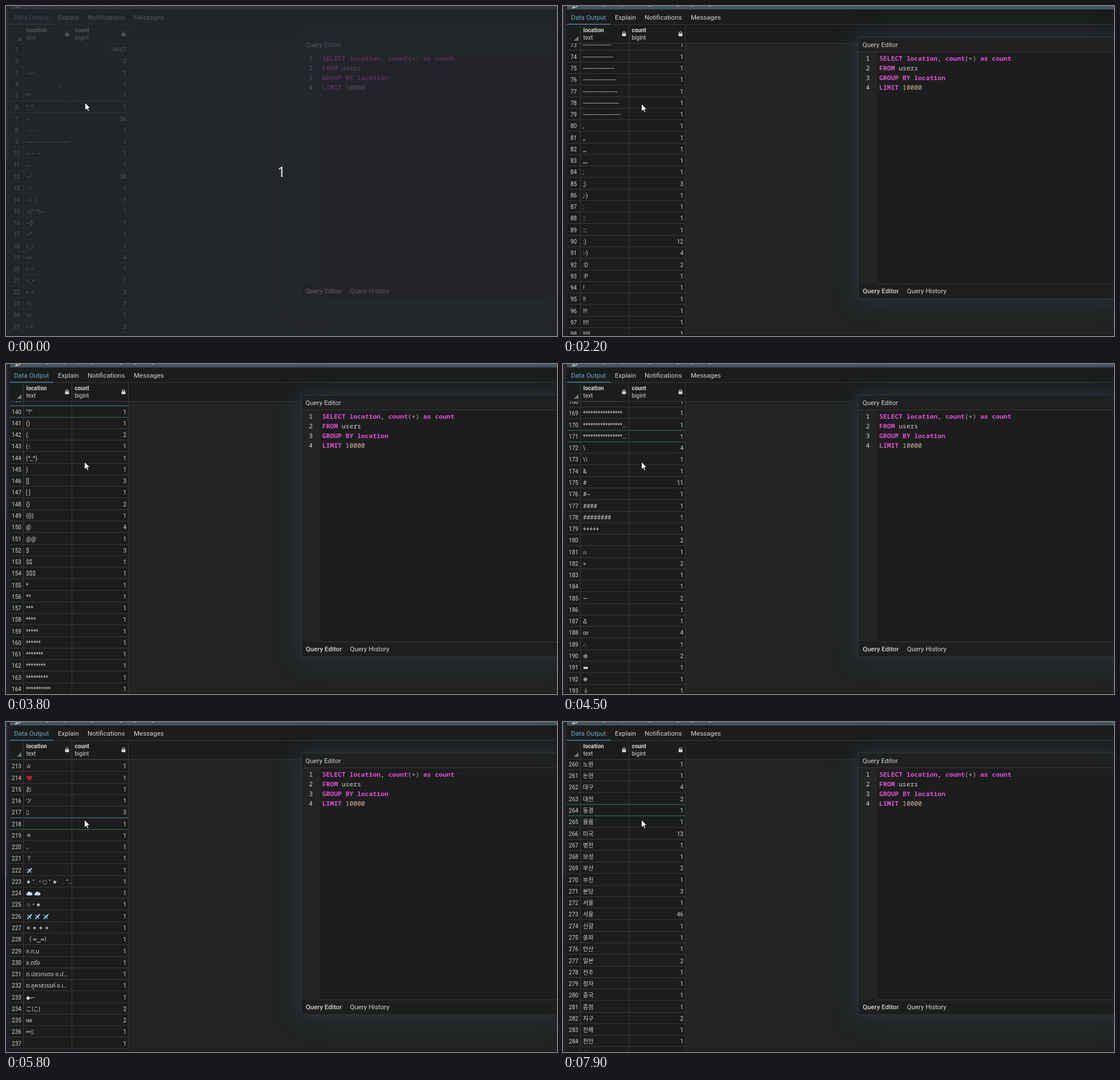
Animation, 966 px wide and 579 px high, one loop 8000 ms. Source, as an HTML page:

```html
<!DOCTYPE html>
<html lang="en">
<head>
<meta charset="utf-8">
<title>Query result</title>
<style>
html, body { margin: 0; width: 100%; height: 100%; overflow: hidden; background: #212423; }
#stage { position: relative; width: 966px; height: 579px; overflow: hidden; background: #212423;
  font: 11.5px Roboto, "Noto Sans", sans-serif; color: #d3d5d2; }
#stage div, #stage svg.abs { position: absolute; }
.t { line-height: 20px; white-space: pre; }
.h { font-size: 10px; }
b { font-weight: 700; }
#body { left: 7px; top: 66px; width: 208px; height: 511px; overflow: hidden; background: #1b1d1c; font-size: 10px; }
#rows { left: 0; top: -1px; width: 208px; }
.row { left: 0; width: 208px; height: 20px; line-height: 24px; border-bottom: 1px solid #36393e; white-space: pre; }
.row span { position: absolute; top: 0; }
.num { left: 0; width: 23px; text-align: center; }
.loc { left: 28px; width: 80px; height: 20px; overflow: hidden; text-spacing-trim: space-all;
  font-family: Roboto, "Noto Sans", "DejaVu Sans", "Noto Sans CJK KR", "Noto Sans CJK JP", "Noto Sans Thai", sans-serif; }
.cnt { right: 4px; }
.loc svg { width: 12px; height: 11px; vertical-align: -2px; }
#hover { left: 0; width: 208px; height: 19px; border: solid #3a6878; border-width: 1px 0; }
.v { width: 1px; background: #36393e; }
.hl { height: 1px; background: #36393e; }
#panel { left: 517px; top: 54px; width: 460px; height: 458px; background: #1c1e1d; border: 1px solid #343842;
  box-shadow: 0 2px 34px 4px #2c303b; }
.code { font: 11.35px/20px "Noto Sans Mono", "DejaVu Sans Mono", monospace; }
.code b { color: #e44fd6; }
.code i { color: #dcbb98; font-style: normal; }
.code u { color: #a9aca8; text-decoration: none; }
.code s { position: relative; top: 2px; text-decoration: none; }
#dim { left: 0; top: 0; width: 966px; height: 579px; background: rgba(36, 39, 46, .73); }
#one { left: 433px; top: 272px; width: 100px; text-align: center; color: #f1f1f1;
  font: 25px/36px "Noto Sans", "Open Sans", sans-serif; }
</style>
</head>
<body>
<div id="stage">
  <div style="left:0;top:0;width:7px;height:579px;background:#1e2129"></div>
  <div style="left:0;top:0;width:3px;height:272px;background:#2a2d36"></div>
  <div style="left:7px;top:0;width:959px;height:66px;background:#1b1d1d"></div>
  <div style="left:7px;top:0;width:959px;height:6px;background:#43555e;overflow:hidden">
    <div class="t" style="left:28px;top:-15px">opening query on postgres/postgres@PostgreSQL</div>
    <svg class="abs" style="left:7px;top:-6px" width="12" height="11"><path d="M2 10L5 7a4 4 0 1 1 3 1z" fill="none" stroke="#d3d5d2" stroke-width="1.3"/></svg>
  </div>
  <div class="hl" style="left:7px;top:32px;width:959px"></div>
  <div style="left:7px;top:31px;width:76px;height:2px;background:#3b7085"></div>
  <div class="t" style="left:14px;top:10px;color:#68abc6">Data Output</div>
  <div class="t" style="left:91px;top:10px">Explain</div>
  <div class="t" style="left:143px;top:10px">Notifications</div>
  <div class="t" style="left:224px;top:10px">Messages</div>

  <div class="hl" style="left:7px;top:65px;width:511px"></div>
  <svg class="abs" style="left:19px;top:53px" width="8" height="8"><path d="M8 0V8H0z" fill="#777a7b"/></svg>
  <div class="t h" style="left:35.5px;top:33px"><b>location</b></div>
  <div class="t h" style="left:35.5px;top:46px">text</div>
  <div class="t h" style="left:120.5px;top:33px"><b>count</b></div>
  <div class="t h" style="left:120.5px;top:46px">bigint</div>
  <svg class="abs" style="left:0;top:44px" width="215" height="11" fill="#cfd1ce" stroke="#cfd1ce">
    <g id="lock"><path d="M104 4.5h6v4h-6z" stroke-width="1"/><path d="M105 4.5V3a2 2 0 0 1 4 0V4.5" fill="none" stroke-width="1.2"/></g>
    <use href="#lock" x="99"/>
  </svg>

  <div id="body"><div id="rows"><div id="hover"></div></div></div>
  <div class="v" style="left:30px;top:34px;height:543px"></div>
  <div class="v" style="left:115px;top:34px;height:543px"></div>
  <div class="v" style="left:214px;top:34px;height:543px"></div>

  <div id="panel">
    <div style="left:0;top:0;width:460px;height:25px;background:#1f2121"></div>
    <div style="left:0;top:26px;width:33px;height:406px;background:#222524"></div>
    <div style="left:0;top:432px;width:460px;height:26px;background:#1d1f1f"></div>
    <div class="hl" style="left:0;top:25px;width:460px"></div>
    <div class="hl" style="left:33px;top:432px;width:427px"></div>
  </div>
  <div class="t" style="left:525px;top:58px">Query Editor</div>
  <div class="t" style="left:525.5px;top:490px;font-weight:500">Query Editor</div>
  <div class="t" style="left:603px;top:490px">Query History</div>
  <div id="sql"></div>
  <div style="left:0;top:577px;width:966px;height:2px;background:#1c181d"></div>

  <div id="dim"></div>
  <div id="one">1</div>
  <svg class="abs" id="mouse" width="14" height="20"><path d="M1.5 1.5V15L4.6 12.2 6.8 17 9 16 6.8 11.4H11z" fill="#fff" stroke="#111" stroke-width="1"/></svg>
</div>
<script>
const $ = id => document.getElementById(id);
const PITCH = 20.27, LOOP = 8000, TIP = 106;

// n lines of a growing run of one character
const fill = (ch, from, n) => Array.from({ length: n }, (_, i) => ch.repeat(from + i)).join("\n");

// one line per row: location, then ¦count where it is not 1
const data = String.raw`¦14667
ˋ¦2
ˋ~~
ˋ                      _
^^
^_^
~¦56
~~
~~~~~~~~~~~
~ ~ ~
~-
~/¦58
~/.
~/../
~(^.^)~
~$
~*
<_<
==¦4
= =
=_=
=.=¦3
=)¦7
><
>.<¦2
>_<¦6
>.>
>_>¦2
${fill(">", 2, 4)}
${fill("|", 1, 5)}
|_|
ˋシャンハイ
_¦5
___
______         ______
¯\_(ツ)_/¯¦23

-¦174
-<
-> ( | )
- -
- -
-_-¦2
-_-!!!
--¦11
--
-- -- --
---¦10
--->  .   <---
----¦3
---- - ---- ------ - -----…
---- *
-----¦2
------
-------¦3
-------->
--------->>>
${fill("-", 10, 15)}
${fill(",", 1, 4)}
;
;)¦3
;-)
${fill(":", 1, 3)}
:)¦12
:-)¦4
:D¦2
:P
${fill("!", 1, 5)}
${fill("?", 1, 6)}
${fill("/", 1, 3)}
/dev/null¦9
/root
/tmp
.¦88
.-
.--.--.-/.-/--
./¦4
././
..¦10
../../../../../../../.…
...¦45
...
... =|
....¦4
.....¦2
......¦2
.......
........
.........¦2
..........
${".".repeat(13)}
${fill(".", 16, 3)}
${".".repeat(22)}
· · ·
···✈
,. , ☾ ,. ,
'¦2
'"><
"
""
"?"
()
(:¦2
(-:
(^_^)
)
[]¦3
[ ]
{}¦2
{{}}
@¦4
@@
$¦3
$$
$$$
${fill("*", 1, 14)}
${"*".repeat(16)}
${"*".repeat(16)}…
${"*".repeat(16)}…
\¦4
\\
&
#¦11
#~
####
########
+++++
¦2
⍾
⌖¦2


—¦2

Δ
∞¦4
∴
⊕¦2
▬
❋
⏚
${[..."◆◇○●◎☁☂☃☆★☠☮☯☺♠♡♥♪♫"].join("\n")}
✰
❤
お
ツ
▯¦3

＊
，
？
✈
★ ° . • ○ ° ★　. °…
☁ ☁
☆ • ★
✈ ✈ ✈
✶ ✶ ✶ ✶
（ ═‿═）
ก.ท.ม
จ.ตรัง
ต.ปลวกแดง อ.ป…
ต.คูหาสวรรค์ อ.เ…
◆⌐
こ|こ|¦2
нк¦2
⚯▯

……

Kγ
⋱..⋰
☀♒
☁¦25
⚓
⚡¦2
⛵
✈¦5
✈¦20
❤
。。
うぃ
ここ
ちば
タイ
ㅁㅇ
강남¦2
과천
광주
나도
노원
논현
대구¦4
대전¦2
동경
몰름
미국¦13
병천
보성
부산¦2
부천
분당¦3
서올
서울¦46
신갈
쏭파
안산
일본¦2
전주
정자
중국
증점
지구¦2
진해
천안
청주`.split("\n");

const icons = {
  "✈": ["#4d9cc4", "M1 2.5L8 4 9 8 9.5 11 8 11 6 6 1 4z", "#b9e2f3", "M1 10L9 1.5 11.5 .5 10.5 3 3 11z"],
  "❤": ["#cc1735", "M6 11L1 6C-1 3 3-1 6 3 9-1 13 3 11 6z"],
  "☁": ["#c5dbe6", "M2.5 10a2.3 2.3 0 0 1 0-4.6 3.2 3.2 0 0 1 6-1A2.8 2.8 0 0 1 9.5 10z", "#edf5f8", "M3 7a2.5 2.5 0 0 1 5-2z"],
  "☀": ["#f2a51f", "M6 0L7.5 3 10.5 1.5 9 4.5 12 6 9 7.5 10.5 10.5 7.5 9 6 12 4.5 9 1.5 10.5 3 7.5 0 6 3 4.5 1.5 1.5 4.5 3z"],
  "♒": ["#9150c4", "M6 .3a5.7 5.7 0 0 1 0 11.4A5.7 5.7 0 0 1 6 .3z", "#eddcf5", "M2 5.5L4 3.5 6 5 8 3.5 10 5V6L8 4.7 6 6.2 4 4.7zM2 9L4 7 6 8.5 8 7 10 8.5V9.5L8 8.2 6 9.7 4 8.2z"],
  "⚡": ["#f6b42c", "M8 0L2 7H5.5L4 12 10.5 5H6.8z"],
  "⛵": ["#a8c9d6", "M6 1V8H2zM7 2L10 8H7z", "#4f93b5", "M0 8.5H12V11.5H0z"]
};
const icon = ch => {
  let s = "";
  for (let i = 0; i < icons[ch].length; i += 2) s += `<path fill="${icons[ch][i]}" d="${icons[ch][i + 1]}"/>`;
  return `<svg viewBox="0 0 12 12">${s}</svg>`;
};
const markup = s => s.replace(/&/g, "&amp;").replace(/</g, "&lt;").replace(/[✈❤☁☀♒⚡⛵]/g, icon);
const rowTop = i => Math.round(i * PITCH) + "px";

$("rows").insertAdjacentHTML("afterbegin", data.map((line, i) => {
  const [text, count = 1] = line.split("¦");
  return `<div class="row" style="top:${rowTop(i)}"><span class="num">${i + 1}</span>` +
    `<span class="loc">${markup(text)}</span><span class="cnt">${count}</span></div>`;
}).join(""));

$("sql").innerHTML = [
  "<b>SELECT location</b>, <b>count</b><u>(<s>*</s>)</u> <b>as count</b>",
  "<b>FROM</b> users",
  "<b>GROUP BY location</b>",
  "<b>LIMIT</b> <i>10000</i>"
].map((line, i) => `<div class="t code" style="left:531px;top:${82 + i * 17}px">${i + 1}</div>` +
  `<div class="t code" style="left:554.5px;top:${82 + i * 17}px">${line}</div>`).join("");

// the list jumps every 100 ms inside these bursts
const times = [0];
for (const [a, b] of [[300, 500], [700, 900], [1200, 1200], [1400, 1400], [1700, 2200], [2400, 2500], [2700, 3300],
  [3500, 5500], [5800, 6100], [6300, 6800], [7000, 7200], [7400, 7600], [7800, 7900]])
  for (let t = a; t <= b; t += 100) times.push(t);

// known [time, scroll] pairs, evenly divided over the jumps between them
const keys = [[0, 0], [300, 0], [900, 790], [1200, 795], [1400, 779], [3000, 2155], [3100, 2270], [4400, 3350],
  [4500, 3395], [5500, 4295], [5800, 4296], [6800, 4688], [7000, 4772], [7800, 5236], [7900, 5252]];
const scroll = [0];
for (let k = 1; k < keys.length; k++) {
  const [a, b] = [keys[k - 1], keys[k]], i = times.indexOf(a[0]), n = times.indexOf(b[0]) - i;
  for (let j = 1; j <= n; j++) scroll[i + j] = Math.round(a[1] + (b[1] - a[1]) * j / n);
}

function draw(now) {
  const t = now % LOOP;
  const step = times.filter(s => s <= t).length - 1;
  // the highlight lags one jump behind the pointer
  const row = Math.floor((scroll[Math.max(0, step - 1)] + TIP) / PITCH);
  const start = t < 300;
  $("rows").style.transform = `translateY(${-scroll[step]}px)`;
  $("hover").style.top = rowTop(row);
  $("dim").style.display = $("one").style.display = start ? "" : "none";
  $("mouse").style.left = (start ? 137 : 135.5) + "px";
  $("mouse").style.top = (start ? 167.5 : 170) + "px";
  requestAnimationFrame(draw);
}
requestAnimationFrame(draw);
</script>
</body>
</html>
```
